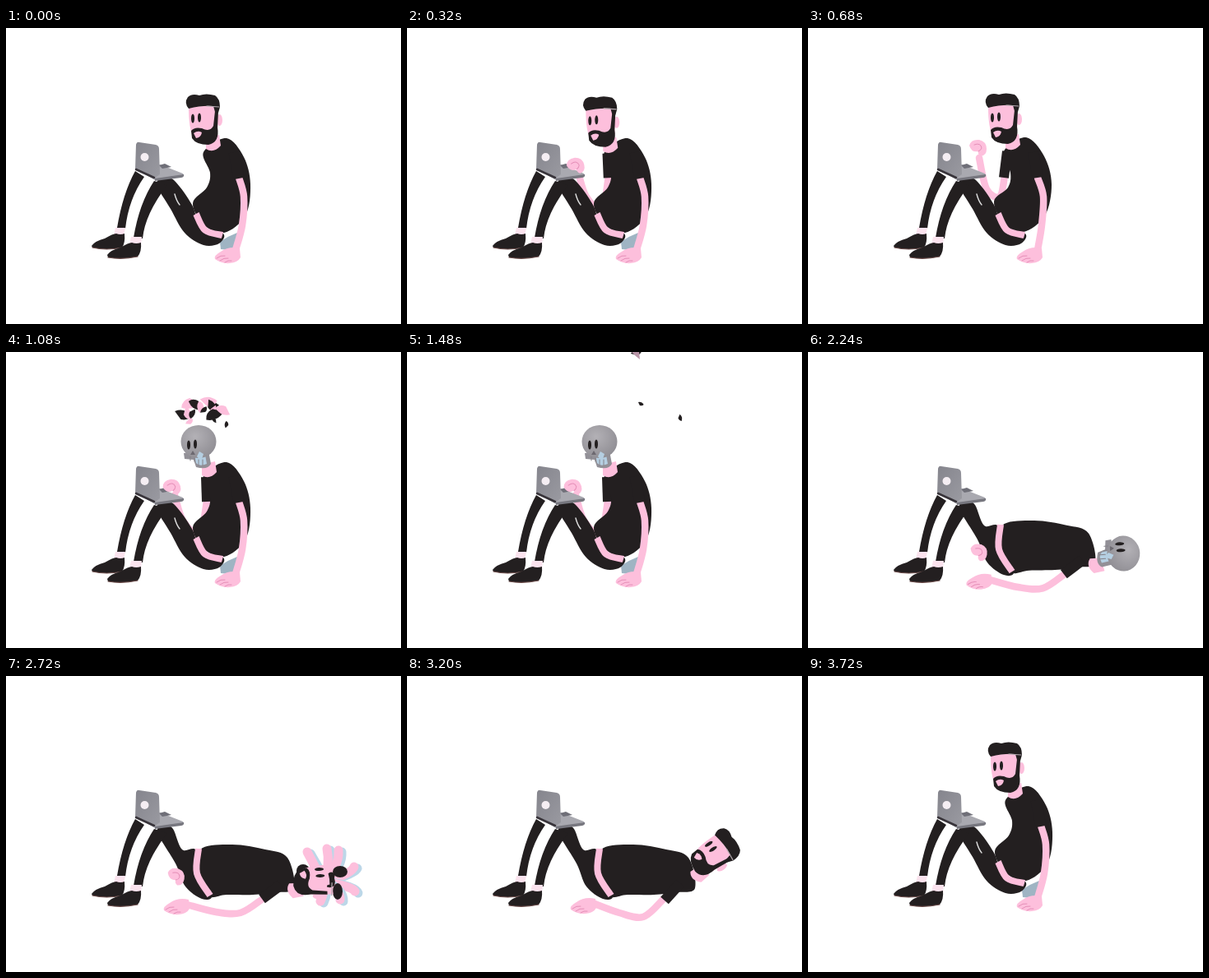
An HTML page that plays this animation: 480 by 360 pixels, repeating every 3960 ms.

```html
<!DOCTYPE html>
<html lang="en">
<head>
<meta charset="utf-8">
<title>Laptop slump</title>
<style>
  html, body { margin: 0; width: 100%; height: 100%; overflow: hidden; background: #fff; }
  svg { display: block; width: 100vw; height: 100vh; }
  .ink { fill: #231f20; }
  .skin { fill: #fdbfdc; }
  .blue { fill: #b5cfe2; }
  .line { fill: none; stroke-linecap: round; stroke-linejoin: round; }
  .limb { stroke: #fdbfdc; stroke-width: 8.5; }
  .crease { stroke: #e58fb8; stroke-width: 1; }
  .sole { stroke: #6b4a48; stroke-width: 1.2; }
</style>
</head>
<body>
<svg viewBox="0 0 480 360" xmlns="http://www.w3.org/2000/svg">
  <defs>
    <radialGradient id="bone" cx=".4" cy=".35" r=".75">
      <stop offset="0" stop-color="#b3b1b6"/><stop offset="1" stop-color="#8d8b91"/>
    </radialGradient>
    <linearGradient id="lid" x2="1" y2="1">
      <stop offset="0" stop-color="#85858d"/><stop offset="1" stop-color="#9a9aa1"/>
    </linearGradient>
  </defs>

  <path id="ground" fill="#9fb4c3" d="M260 260 Q270 253 281 249 L283 264 Q272 271 261 269Z"/>
  <path id="farArm" class="line limb"/>
  <path id="farSleeve" class="line" stroke="#231f20" stroke-width="12" style="stroke-linecap:butt"/>

  <g id="backLeg">
    <path class="ink" d="M157 174 Q142 201 135 243 L145 244 Q149 208 168 181Z"/>
    <path fill="#fbe3ee" d="M133 243 L145 243 L143 253 L131 252Z"/>
    <path class="ink" d="M104 265 Q108 259 120 256 Q130 250 134 250 Q139 252 144 250 Q145 262 141 267 Q122 271 105 267Z"/>
    <path class="line sole" d="M105 267 Q122 271 141 267"/>
  </g>
  <path id="hip" class="ink"/>
  <path id="gloss" class="line" stroke="#ddd" stroke-width="1.4" d="M205 202 Q207 210 211 215"/>
  <g id="frontLeg">
    <path class="ink" d="M180 186 Q162 213 155 255 L166 256 Q169 226 196 191Z"/>
    <path fill="#fbe3ee" d="M152 254 L165 254 L164 264 L150 263Z"/>
    <path class="ink" d="M123 276 Q127 270 139 267 Q149 261 153 261 Q158 263 164 261 Q165 272 160 278 Q141 282 124 279Z"/>
    <path class="line sole" d="M124 279 Q141 282 160 278"/>
  </g>
  <g id="laptop">
    <path fill="#a9a9b0" d="M157 171 L187 166 L215 177 Q217 180 213 181 L181 185Z"/>
    <path fill="#6f6f78" d="M186 167 L193 165 L201 169 L190 171Z"/>
    <path fill="#77777f" d="M181 183 L216 178 Q217 181 213 182 L181 186Z"/>
    <path fill="url(#lid)" d="M162 139 L182 142 Q186 143 186 147 L187 178 L180 183 L157 172 L158 142 Q159 138 162 139Z"/>
    <path class="line" stroke="#38343a" stroke-width="2.5" d="M158 172 L180 182"/>
    <circle cx="168.500" cy="157" r="5" fill="#f5eef3"/>
  </g>
  <g id="farHand">
    <path class="skin" d="M-10 -3 Q-8 -11 2 -10 Q11 -8 11 1 Q11 9 4 10 Q0 8 1 4 Q-7 6 -10 -3Z"/>
    <path class="line crease" d="M-4 -4 Q4 -7 5 0 Q4 3 1 4"/>
  </g>
  <path id="torso" class="ink"/>
  <path id="band" class="line" stroke="#fdbfdc" stroke-width="8" style="stroke-linecap:butt"/>
  <path id="arm" class="line limb"/>
  <path id="sleeve" class="line" stroke="#231f20" stroke-width="13" style="stroke-linecap:butt"/>
  <g id="hand">
    <path class="skin" d="M14 -8 Q1 -11 -9 -4 Q-18 1 -16 5 Q-8 11 2 10 Q12 9 15 3Z"/>
    <path class="line crease" d="M-14 4 Q-9 0 -4 1 M-10 7 Q-5 3 0 4 M-4 9 Q0 6 4 7"/>
  </g>

  <g id="burst"></g>
  <g id="splash"></g>
  <g id="head">
    <path class="skin" d="M243 134 L259 130 L261 143 Q252 153 243 147Z"/>
    <g id="skull">
      <path fill="#929097" d="M221 120 L251 117 L254 133 Q250 141 236 137 L233 128 L222 127Z"/>
      <path class="blue" d="M234 121 Q241 116 247 122 L249 133 Q240 137 236 132Z"/>
      <path class="line" stroke="#85838a" d="M229 124 V129 M234 125 V130 M239 128 V135 M244 128 V135"/>
      <ellipse cx="239" cy="106" rx="21.500" ry="20" fill="url(#bone)"/>
      <path class="blue" d="M237 124 L240 118 L245 121 L242 130Z"/>
      <path fill="#6c6970" d="M229 122 L232 117 L235 122Z"/>
    </g>
    <g id="face">
      <path class="skin" d="M222 96 L258 94 L257 130 Q242 140 228 133 Q222 124 222 96Z"/>
      <ellipse class="skin" cx="259.500" cy="112" rx="3.500" ry="7"/>
      <path class="ink" d="M225 125 Q229 120 238 122 Q248 127 252 119 L254 101 L258 101 L257 121 Q260 139 246 142 Q231 142 226 134Z"/>
      <path class="skin" d="M228 128 Q233 124 238 127 Q237 133 231 134Z"/>
      <path id="hair" class="ink" d="M222 98 Q216 91 221 84 Q226 79 235 82 Q243 79 254 82 Q260 86 260 96 L258 103 L254 102 L252 95 Q238 94 222 98Z"/>
      <path class="line" stroke="#b8adb3" stroke-width="1.200" d="M244 95 L259 96"/>
    </g>
    <ellipse class="ink" cx="227" cy="110" rx="2" ry="5.500"/>
    <ellipse class="ink" cx="235" cy="109" rx="2" ry="5.500"/>
  </g>
</svg>
<script>
const LOOP = 3960, STEP = 40;
const $ = id => document.getElementById(id);
const mix = (a, b, k) => a + (b - a) * k;
const clamp = v => Math.max(0, Math.min(1, v));
const ramp = (t, a, b) => clamp((t - a) / (b - a));
const smooth = k => k * k * (3 - 2 * k);

const sit = {
  head: [241, 108, 0],
  torso: [240,151, 268,134, 289,157, 297,190, 291,228, 265,249, 240,239, 227,213, 244,194, 248,176],
  hip: [183,190, 194,182, 206,187, 226,215, 237,242, 264,250, 259,262, 240,264, 217,249, 200,220],
  band: [231,226, 242,246, 263,252],
  sleeve: [277,151, 283,183],
  arm: [283,182, 289,205, 287,240, 279,270],
  hand: [270, 276, 0],
  farSleeve: [252,160, 258,185],
  farArm: [258,180, 264,190, 264,205, 262,215],
  farHand: [262, 220, 0],
  ground: [1], gloss: [1]
};
const raise = {
  ...sit,
  head: [238, 107, 0],
  torso: [238,150, 265,133, 287,156, 296,190, 288,228, 262,248, 239,239, 226,211, 243,194, 246,176],
  sleeve: [274,151, 279,182],
  arm: [279,182, 286,205, 284,240, 279,270],
  farSleeve: [242,150, 238,182],
  farArm: [239,180, 233,205, 217,196, 208,158],
  farHand: [206, 146, 0],
  ground: [0]
};
const press = {
  ...sit,
  head: [236, 111, 0],
  farSleeve: [243,152, 244,182],
  farArm: [244,182, 235,222, 215,205, 205,174],
  farHand: [201, 165, -15]
};
const lean = {
  head: [290, 142, 22],
  torso: [266,178, 292,167, 308,183, 315,210, 302,249, 250,274, 236,250, 237,215, 258,211, 264,198],
  hip: [183,190, 194,182, 203,186, 217,213, 232,214, 240,250, 250,274, 230,274, 213,250, 203,222],
  band: [234,215, 234,247, 248,273],
  sleeve: [303,184, 302,219],
  arm: [301,217, 295,248, 272,231, 250,210],
  hand: [242, 201, 42],
  farSleeve: [280,185, 276,205],
  farArm: [276,205, 270,220, 264,222, 258,218],
  farHand: [257, 222, 0],
  ground: [0], gloss: [0]
};
const lie = {
  head: [383, 249, 88],
  torso: [342,221, 350,258, 328,263, 300,266, 268,266, 246,268, 234,245, 236,211, 275,205, 315,211],
  hip: [184,190, 194,182, 203,186, 214,211, 231,212, 236,245, 250,268, 238,271, 218,256, 206,228],
  band: [234,210, 232,240, 248,267],
  sleeve: [334,254, 311,271],
  arm: [312,271, 285,288, 255,287, 220,278],
  hand: [208, 280, 0],
  farSleeve: [300,240, 280,240],
  farArm: [280,240, 250,240, 230,245, 215,245],
  farHand: [206, 244, 10],
  ground: [0], gloss: [0]
};
const lift = {
  ...lie,
  head: [376, 215, 57],
  sleeve: [332,252, 313,273],
  arm: [311,272, 287,293, 258,288, 228,277],
  hand: [215, 279, 0],
  farArm: [280,240, 260,240, 255,245, 250,245],
  farHand: [250, 245, 0]
};
const rise = {
  ...lean,
  arm: [301,217, 295,245, 278,263, 257,275],
  hand: [248, 278, 0]
};

const keys = [
  [0, sit], [80, sit], [360, press], [640, raise], [720, raise], [880, press],
  [1600, press], [2000, lean], [2260, lie], [2900, lie], [3200, lift],
  [3440, rise], [3680, sit], [LOOP, sit]
];

function poseAt(t) {
  const i = Math.max(1, keys.findIndex(k => k[0] > t));
  const [t0, a] = keys[i - 1], [t1, b] = keys[i];
  const k = smooth(ramp(t, t0, t1)), pose = {};
  for (const part in a) pose[part] = a[part].map((v, n) => mix(v, b[part][n], k));
  return pose;
}

// Catmull-Rom curve through flat x,y pairs.
function curve(flat, closed) {
  const n = flat.length / 2;
  const at = i => {
    const j = closed ? (i + n) % n : Math.max(0, Math.min(n - 1, i));
    return [flat[2 * j], flat[2 * j + 1]];
  };
  let d = "M" + at(0);
  for (let i = 0; i < (closed ? n : n - 1); i++) {
    const [p, q, r, s] = [at(i - 1), at(i), at(i + 1), at(i + 2)];
    const c1 = q.map((v, j) => v + (r[j] - p[j]) / 6);
    const c2 = r.map((v, j) => v - (s[j] - q[j]) / 6);
    d += `C${c1} ${c2} ${r}`;
  }
  return closed ? d + "Z" : d;
}

function add(parent, tag, attrs) {
  const el = document.createElementNS("http://www.w3.org/2000/svg", tag);
  for (const name in attrs) el.setAttribute(name, attrs[name]);
  return $(parent).appendChild(el);
}
const place = (el, x, y, r, s = 1) =>
  el.setAttribute("transform", `translate(${x} ${y}) rotate(${r}) scale(${s})`);
const show = (el, on) => { el.style.display = on ? "" : "none"; };

// Chips thrown off the head: a few slow ones and a fan of quick ones.
const chips = [[39, -92, 7, 620], [44, -29, 3.5, 620], [92, -12, 4, 620]]
  .map(([dx, dy, size, life]) => ({ dx, dy, size, life }));
for (let i = 0; i < 13; i++) {
  const angle = -2.75 + i * 0.17, reach = 62 + (i * 37 % 50);
  chips.push({ dx: Math.cos(angle) * reach, dy: Math.sin(angle) * reach, size: 5 + i * 5 % 7, life: 400 });
}
chips.forEach((c, i) => {
  c.el = add("burst", "path", {
    class: i > 2 && i % 2 ? "skin" : "ink",
    d: "M-1 .3 Q-.4 -.8 .9 -.6 Q1 .2 .2 .6Z"
  });
});
add("burst", "path", { id: "shard", fill: "#b996a8", d: "M273 0 L282 0 L283 9 L278 5Z" });

const tips = [[366,214], [390,210], [404,212], [423,232], [424,262], [382,274], [406,272]];
const tendrils = tips.flatMap(tip => [["#bcd7e8", 4], ["#fdbfdc", 0]].map(([stroke, shift]) => ({
  tip, shift, el: add("splash", "path", { class: "line", stroke, "stroke-width": 11 })
})));
const spots = [[406,238,9,7], [403,262,6,10], [361,237,8,8]].map(([cx, cy, rx, ry]) =>
  add("splash", "ellipse", { class: "ink", cx, cy, rx, ry }));

function drawBurst(t) {
  const age = t - 1040, on = age >= 0 && age < 640;
  show($("burst"), on);
  if (!on) return;
  chips.forEach((c, i) => {
    const u = Math.pow(age / 440, 0.5);
    const s = c.size * (1 - ramp(age, c.life * 0.72, c.life));
    place(c.el, 240 + c.dx * u, 92 + c.dy * u, i * 50 + (age - 440) * 0.4, s);
  });
  show($("shard"), age > 400 && age < 520);
}

function drawSplash(t) {
  const reach = t < 2720 ? smooth(ramp(t, 2580, 2720)) : t < 2800
    ? mix(1, 1.15, ramp(t, 2720, 2800)) : 1.15 * (1 - smooth(ramp(t, 2800, 2980)));
  show($("splash"), reach > 0);
  for (const { tip, shift, el } of tendrils) {
    const x = mix(386, tip[0], reach), y = mix(248, tip[1], reach);
    el.setAttribute("d", `M${386 + shift} 250 Q${mix(386, x, 0.8) + 5 + shift} ${mix(250, y, 0.5)} ${x + shift} ${y + shift / 2}`);
  }
  spots.forEach(el => show(el, reach > 0.5));
}

function draw(t) {
  const p = poseAt(t);
  for (const id of ["torso", "hip"]) $(id).setAttribute("d", curve(p[id], true));
  for (const id of ["band", "sleeve", "arm", "farSleeve", "farArm"]) $(id).setAttribute("d", curve(p[id]));
  for (const id of ["hand", "farHand"]) place($(id), ...p[id]);
  for (const id of ["ground", "gloss"]) $(id).setAttribute("opacity", p[id][0]);

  const bare = t >= 1040 && t < 2640;
  show($("skull"), bare);
  show($("face"), !bare);
  const [x, y, r] = p.head;
  const swell = 1 + 0.12 * ramp(t, 920, 1040) * (t < 1040);
  $("head").setAttribute("transform", `translate(${x} ${y}) rotate(${r}) scale(${swell}) translate(-241 -108)`);
  const grow = t >= 2640 ? mix(0.45, 1, smooth(ramp(t, 2720, 2920))) : 1;
  $("hair").setAttribute("transform", `translate(241 100) scale(${grow}) translate(-241 -100)`);
  drawBurst(t);
  drawSplash(t);
}

const start = performance.now();
function tick() {
  const t = Math.max(0, performance.now() - start) % LOOP;
  draw(Math.floor(t / STEP) * STEP);
  requestAnimationFrame(tick);
}
tick();
</script>
</body>
</html>
```
